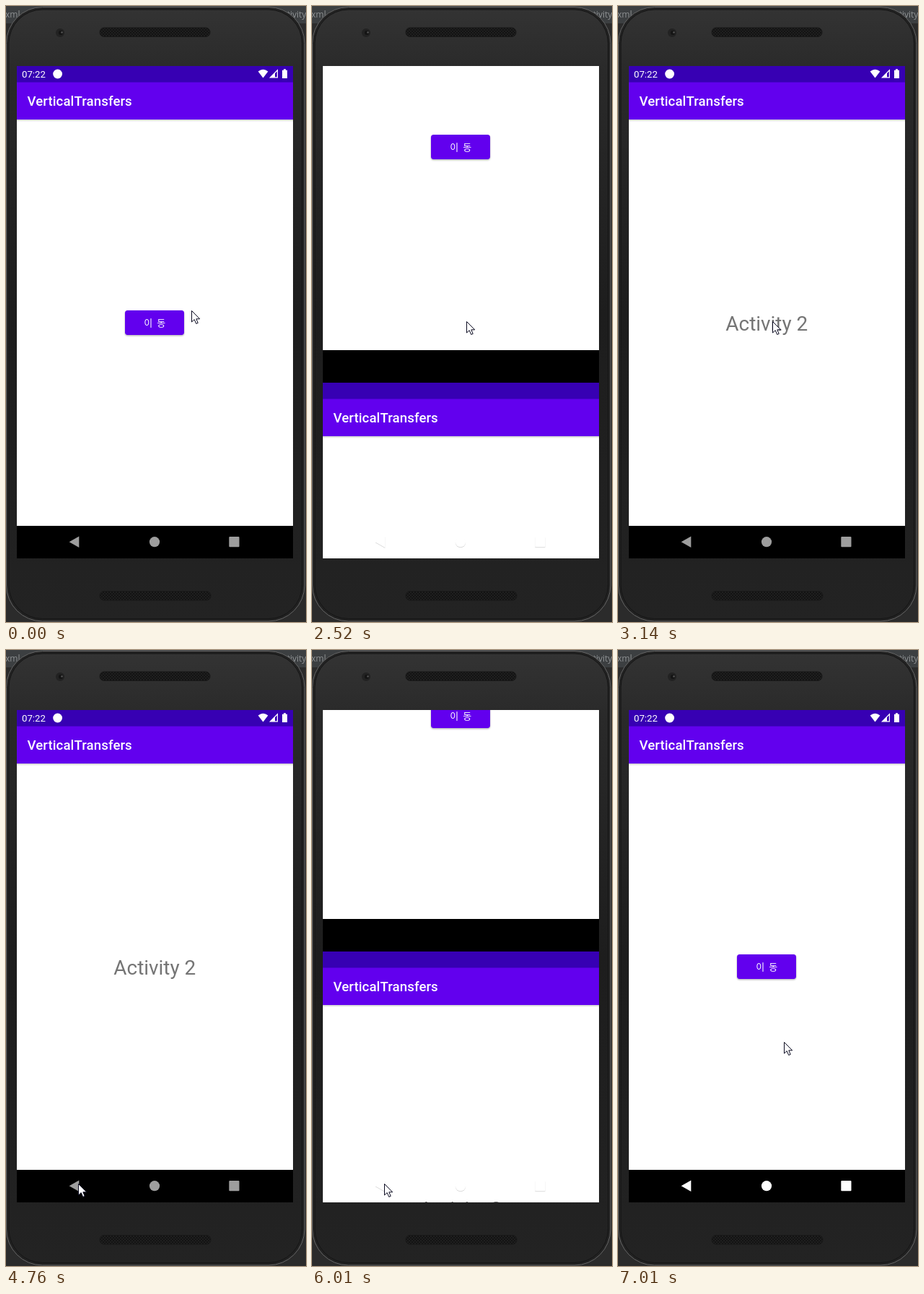
Recreate the animation shown at these times as an HTML page. Size 416 px wide and 852 px high, loop 7.64 s.

```html
<!DOCTYPE html>
<html lang="ko">
<head>
<meta charset="utf-8">
<title>Screen slide</title>
<style>
  html, body { margin: 0; width: 100%; height: 100%; overflow: hidden; background: #2b2b2b; }
  svg { display: block; width: 416px; height: 852px; }
  text { white-space: pre; }
  .ui { font-family: Roboto, sans-serif; }
  .title { font-size: 18.6px; font-weight: 500; letter-spacing: .1px; fill: #fff; }
  .label { font: 500 13px "Noto Sans CJK KR", "Noto Sans CJK", "Noto Sans KR", sans-serif; letter-spacing: 1.16px; fill: #fff; }
  .tab { font: 12px "Open Sans", sans-serif; fill: #8f9294; }
</style>
</head>
<body>
<svg viewBox="0 0 416 852" xmlns="http://www.w3.org/2000/svg">
  <defs>
    <linearGradient id="body" x1="0" y1="0" x2="0" y2="1">
      <stop offset="0" stop-color="#333"/>
      <stop offset=".1" stop-color="#2a2a2a"/>
      <stop offset=".5" stop-color="#1d1d1d"/>
      <stop offset="1" stop-color="#232323"/>
    </linearGradient>
    <linearGradient id="drop" x1="0" y1="0" x2="0" y2="1">
      <stop offset="0" stop-color="#000" stop-opacity=".2"/>
      <stop offset="1" stop-color="#000" stop-opacity="0"/>
    </linearGradient>
    <pattern id="mesh" width="4" height="4" patternUnits="userSpaceOnUse">
      <rect width="4" height="4" fill="#1f1f1f"/>
      <circle cx="1" cy="1" r="1" fill="#0e0e0e"/>
      <circle cx="3" cy="3" r="1" fill="#0e0e0e"/>
    </pattern>
    <filter id="soft" x="-10%" y="-30%" width="120%" height="160%"><feGaussianBlur stdDeviation="1"/></filter>
    <clipPath id="screen"><rect x="15" y="83" width="383" height="681"/></clipPath>
    <clipPath id="buttonClip"><rect x="165" y="421" width="82" height="34" rx="3.7"/></clipPath>
    <g id="icons">
      <path d="M87.6 741.2 L101.3 733.5 V748.9 Z"/>
      <circle cx="206" cy="741.2" r="7.1"/>
      <rect x="309.3" y="734" width="14.2" height="14.2" rx="1"/>
    </g>
  </defs>

  <rect width="416" height="852" fill="#2b2b2b"/>
  <rect width="416" height="24" fill="#3c3f41"/>
  <text class="tab" x="-1" y="16">xml</text>
  <text class="tab" x="384" y="16">ctivity</text>

  <rect x=".5" y="1.5" width="413.5" height="849.5" rx="50" fill="#222" stroke="#666"/>
  <rect x="4" y="5" width="406.5" height="842.5" rx="46.5" fill="url(#body)" stroke="#151515"/>
  <g fill="url(#mesh)" stroke="#181818">
    <rect x="130" y="30" width="153" height="12.5" rx="6"/>
    <rect x="130" y="809.5" width="154" height="12.5" rx="6"/>
  </g>
  <circle cx="75" cy="37" r="6" fill="#222"/>
  <circle cx="76" cy="37" r="3" fill="#141414"/>
  <circle cx="77.5" cy="36.5" r="1.3" fill="#555"/>

  <g id="view" clip-path="url(#screen)"></g>
  <path id="cursor" d="M.5 .5 V16 L4.2 12.6 L6.7 18.4 L9.2 17.4 L6.8 11.8 H11.7 Z" fill="#fff" stroke="#0a0a20"/>
</svg>
<script>
const LOOP = 7640, HEIGHT = 681, SLIDE = 1000;
const OPEN = 2111, CLOSE = 5501;   // when each slide starts
const TICK = 77.25, PHASE = 47;
const $ = id => document.getElementById(id);

const button = `
  <rect x="165" y="422.2" width="82" height="34" rx="3.7" opacity=".3" filter="url(#soft)"/>
  <rect x="165" y="421" width="82" height="34" rx="3.7" fill="#6200ee"/>
  <g clip-path="url(#buttonClip)"><circle id="ripple" cx="214" cy="437" fill="#fff"/></g>
  <text class="label" x="206.8" y="442.5" text-anchor="middle">이 동</text>`;

const heading = `<text class="ui" x="206.3" y="449" font-size="27.9" fill="#757575" text-anchor="middle">Activity 2</text>`;

const page = (id, content) => `
  <g id="${id}">
    <rect x="15" y="83" width="383" height="681" fill="#fff"/>
    <rect x="15" y="157" width="383" height="3" fill="url(#drop)"/>
    <rect x="15" y="83" width="383" height="23" fill="#3700b3"/>
    <rect x="15" y="105.5" width="383" height="51.5" fill="#6200ee"/>
    <rect x="15" y="719" width="383" height="45" fill="#000"/>
    <text class="ui title" x="29.5" y="138.3">VerticalTransfers</text>
    ${content}
  </g>`;

const systemBar = `
  <g fill="#fff">
    <text class="ui" x="22" y="98.9" font-size="13.2">07:22</text>
    <circle cx="71.6" cy="94" r="6.4"/>
    <path d="M356.5 99.6 L349.6 90.6 Q356.5 85 363.4 90.6 Z"/>
    <path d="M376.4 88.8 V98.8 H366.4 Z" fill="none" stroke="#fff" stroke-width="1.2"/>
    <path d="M373 92.3 V98.8 H366.4 Z"/>
    <path d="M383 88.8 H385 V87.3 H388 V88.8 H390 V100 H383 Z"/>
  </g>
  <rect id="touch" x="62" y="723" width="66" height="37" rx="18.5" fill="#fff"/>
  <use href="#icons" y="1" opacity=".14"/>
  <use id="nav" href="#icons"/>`;

$("view").innerHTML = page("first", button) + page("second", heading) + systemBar;

const rest = { x: 257, y: 421 };
const moves = [
  { from: 440, to: 585, x: 256, y: 417 },
  { from: 670, to: 895, x: 240, y: 422 },
  { from: 1200, to: 1360, x: 214, y: 436 },
  { from: 3910, to: 4680, x: 100, y: 738 },
  { from: 6440, to: 6995, x: 230, y: 542 }
];

const ramp = (t, a, b) => Math.min(1, Math.max(0, (t - a) / (b - a)));
const ease = (t, a, b) => (1 - Math.cos(Math.PI * ramp(t, a, b))) / 2;

function pointer(t) {
  let { x, y } = rest;
  for (const m of moves) {
    const k = ease(t, m.from, m.to);
    x += (m.x - x) * k;
    y += (m.y - y) * k;
  }
  return [Math.round(x), Math.round(y)];
}

const move = (id, x, y) => $(id).setAttribute("transform", `translate(${x} ${y})`);

function draw(time) {
  const t = Math.max(0, PHASE + TICK * Math.floor((time - PHASE) / TICK));
  const shift = Math.round(HEIGHT * (ease(t, OPEN, OPEN + SLIDE) - ease(t, CLOSE, CLOSE + SLIDE)));
  move("first", 0, -shift);
  move("second", 0, HEIGHT - shift);
  move("cursor", ...pointer(t));

  // Touch feedback on the button and on the back key
  $("ripple").setAttribute("r", 60 * ramp(t, OPEN - 340, OPEN));
  $("ripple").setAttribute("opacity", .2 * (ramp(t, OPEN - 360, OPEN - 260) - ramp(t, OPEN, OPEN + 300)));
  $("touch").setAttribute("opacity", .2 * (ramp(t, CLOSE - 250, CLOSE - 100) - ramp(t, CLOSE, CLOSE + 300)));

  const light = ramp(t, OPEN, OPEN + 150) - ramp(t, OPEN + 880, OPEN + 1010) + ramp(t, CLOSE, CLOSE + 150);
  const grey = Math.round(158 + 97 * light);
  $("nav").setAttribute("fill", `rgb(${grey},${grey},${grey})`);
}

const begin = performance.now();
function loop() {
  draw((performance.now() - begin) % LOOP);
  requestAnimationFrame(loop);
}
loop();
</script>
</body>
</html>
```
